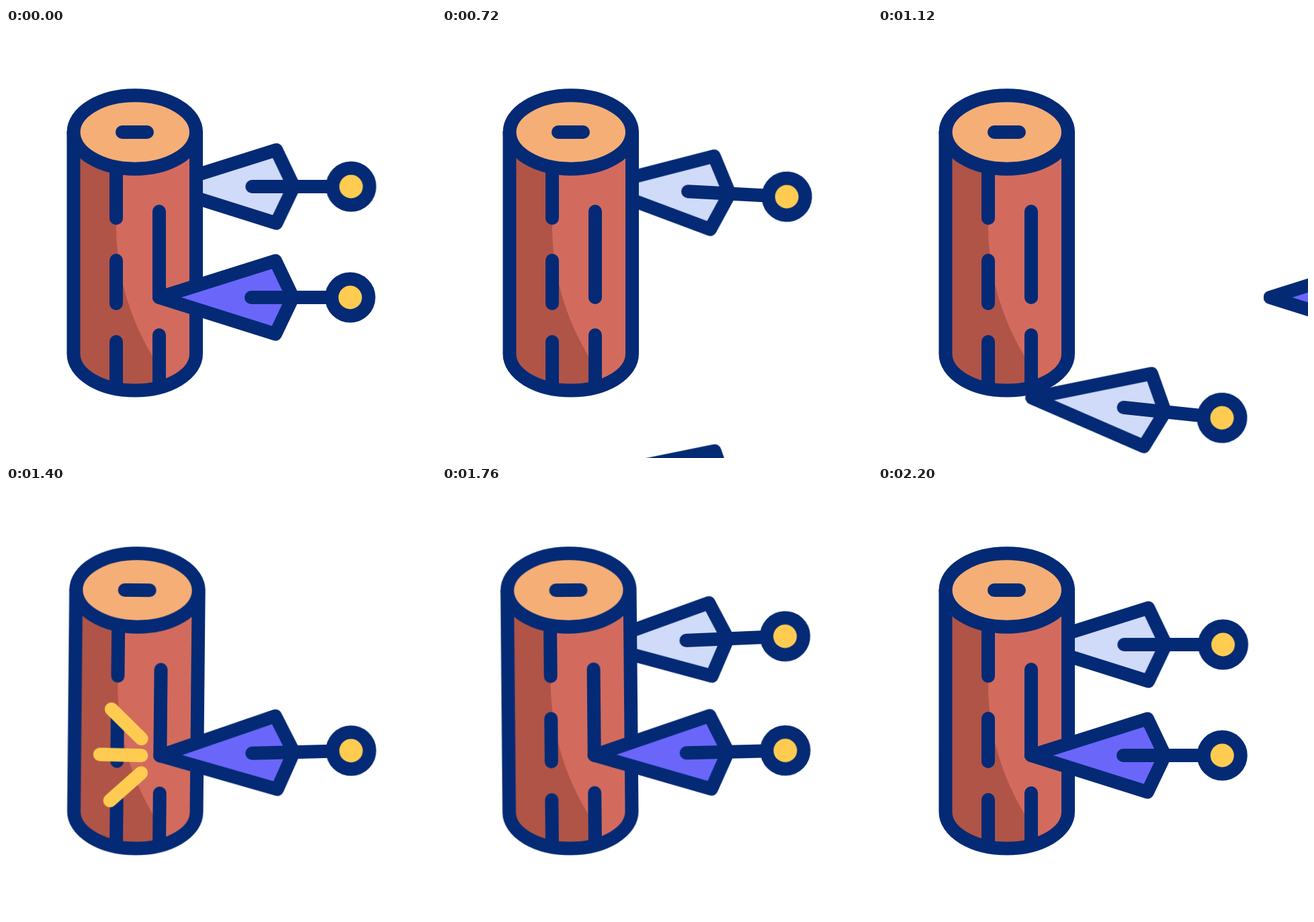
Animation, 640 px wide and 640 px high, one loop 2.4 s. Source, as an HTML page without scripts:

```html
<!DOCTYPE html>
<html lang="en">
<head>
<meta charset="utf-8">
<title>Throwing knives</title>
<style>
html, body { margin: 0; width: 100%; height: 100%; overflow: hidden; background: #fff; }
svg { display: block; width: 100vw; height: 100vh; }
.line { stroke: #042a75; stroke-width: 20; stroke-linecap: round; stroke-linejoin: round; }
.near { fill: #6a66fa; }
.far { fill: #d0daf9; }
.log, .fly, .spin, .sparks { animation: 2.4s linear infinite; }
.log { transform-origin: 192px 540px; animation-name: tilt; animation-timing-function: ease-in-out; }
.near .fly { animation-name: near-fly; }
.far .fly { animation-name: far-fly; }
.near .spin { animation-name: near-spin; animation-timing-function: ease-in-out; }
.far .spin { animation-name: far-spin; animation-timing-function: ease-in-out; }
.sparks {
  fill: none; stroke: #ffcc51; stroke-width: 20; stroke-linecap: round;
  stroke-dasharray: 1 2; opacity: 0; animation-name: burst;
}
.late { animation-delay: .51s; }

/* the log recoils at each hit, then rocks back */
@keyframes tilt {
  0%, 50% { transform: rotate(0deg); }
  54.17% { transform: rotate(-1deg); }
  60.42% { transform: rotate(1deg); }
  70.83%, 71.25% { transform: rotate(0deg); }
  75.42% { transform: rotate(-1deg); }
  81.67% { transform: rotate(1deg); }
  92%, 100% { transform: rotate(0deg); }
}
/* drop with gravity, then fly in from the right */
@keyframes near-fly {
  0% { transform: translate(0, 0); }
  19.42% { transform: translate(0, 0); animation-timing-function: cubic-bezier(.33, 0, .67, .33); }
  32.5% { transform: translate(0, 403px); animation-timing-function: step-start; }
  32.6%, 42.5% { transform: translate(810px, 0); }
  50%, 100% { transform: translate(0, 0); }
}
@keyframes far-fly {
  0% { transform: translate(0, 0); }
  35.12% { transform: translate(0, 0); animation-timing-function: cubic-bezier(.33, 0, .67, .33); }
  50% { transform: translate(0, 521px); animation-timing-function: step-start; }
  50.1%, 63.75% { transform: translate(810px, 0); }
  71.25%, 100% { transform: translate(0, 0); }
}
/* sag before the drop, kick up after the hit */
@keyframes near-spin {
  0%, 9.17% { transform: rotate(0deg); }
  19.17%, 32.5% { transform: rotate(6deg); }
  33%, 50% { transform: rotate(0deg); }
  52.5% { transform: rotate(-1.9deg); }
  58.33% { transform: rotate(-2.05deg); }
  73.33% { transform: rotate(-.9deg); }
  91.67%, 100% { transform: rotate(0deg); }
}
@keyframes far-spin {
  0%, 25% { transform: rotate(0deg); }
  35%, 50% { transform: rotate(6deg); }
  51%, 71.25% { transform: rotate(0deg); }
  73.33% { transform: rotate(-1.9deg); }
  79.6% { transform: rotate(-2deg); }
  91.67%, 100% { transform: rotate(0deg); }
}
@keyframes burst {
  0%, 53.33% { opacity: 0; stroke-dashoffset: 1; }
  53.34% { opacity: 1; stroke-dashoffset: 1; }
  57.9%, 58.75% { opacity: 1; stroke-dashoffset: 0; }
  63.3% { opacity: 1; stroke-dashoffset: -1; }
  63.31%, 100% { opacity: 0; stroke-dashoffset: -1; }
}
</style>
</head>
<body>
<svg viewBox="0 0 640 640">
  <defs>
    <!-- knife with its tip at the origin -->
    <g id="knife" class="line">
      <path d="M0 0L173 -54.5L199 0L173 54.5Z"/>
      <path d="M137 0H258"/>
      <circle cx="284.3" r="27.5" fill="#ffcc51"/>
    </g>
    <g id="rays">
      <path pathLength="1" d="M200 376L155 332.5"/>
      <path pathLength="1" d="M200 401L138.5 400"/>
      <path pathLength="1" d="M200 427L154 468.5"/>
    </g>
    <path id="body" d="M100.5 155V485A91.2 54.5 0 0 0 283 485V155"/>
    <clipPath id="bark"><use href="#body"/></clipPath>
  </defs>

  <g class="log">
    <g class="far" transform="translate(229.3 236)">
      <g class="fly"><g class="spin"><use href="#knife"/></g></g>
    </g>

    <use href="#body" fill="#d26b5d"/>
    <path clip-path="url(#bark)" fill="#b05447" d="M100 155H164V290Q163 400 222 495V540H100Z"/>
    <g class="line" fill="none">
      <use href="#body"/>
      <path d="M164 215V283M164 346V410M164 467V530M228 273V401M228 457V530"/>
      <ellipse cx="191.8" cy="155" rx="91.2" ry="54.7" fill="#f5ae76"/>
      <path d="M173 155H210"/>
    </g>

    <g class="near" transform="translate(228 401)">
      <g class="fly"><g class="spin"><use href="#knife"/></g></g>
    </g>

    <g class="sparks"><use href="#rays"/></g>
    <g class="sparks late"><use href="#rays" y="-165"/></g>
  </g>
</svg>
</body>
</html>
```
